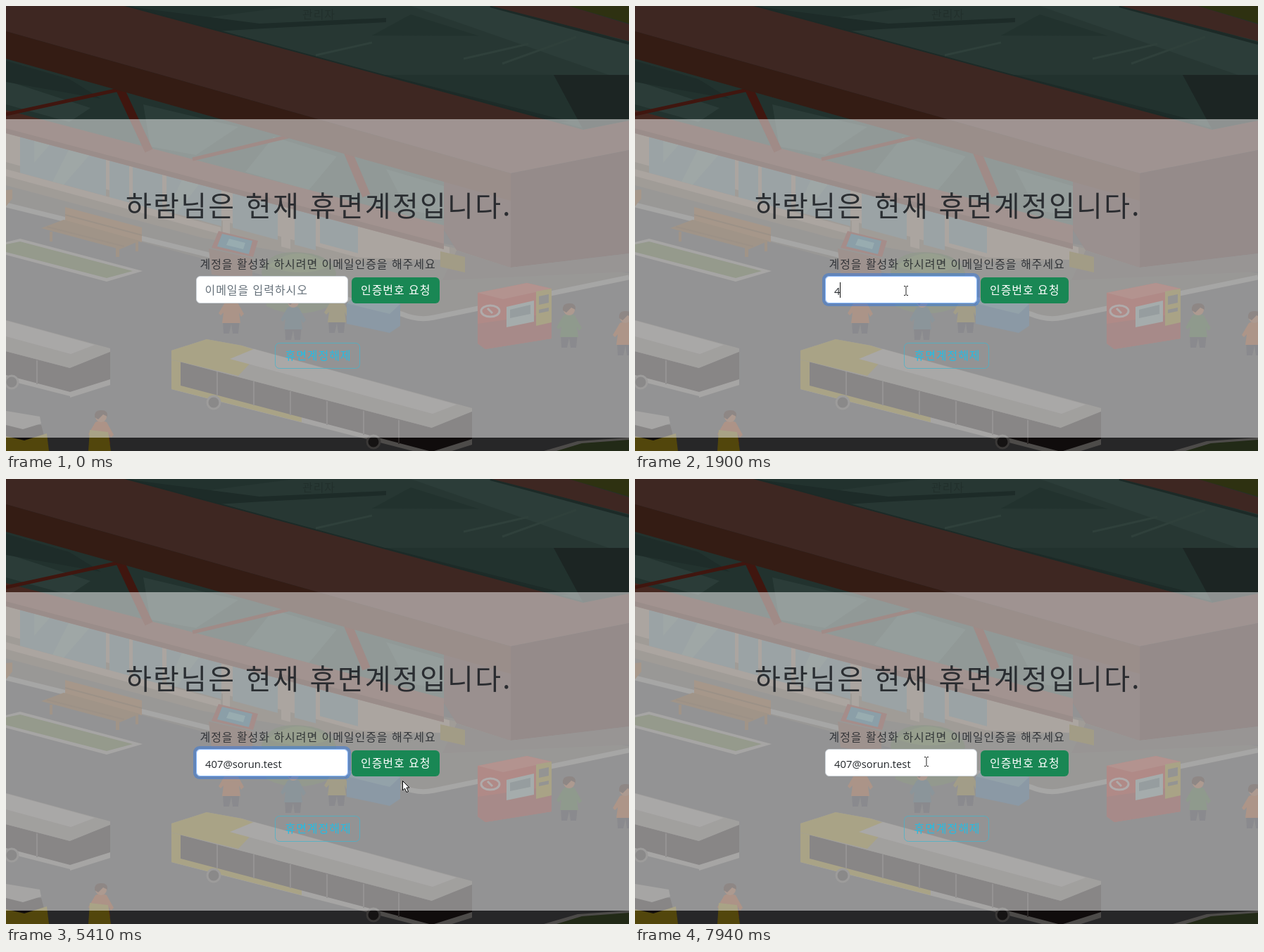
An HTML page that plays this animation: 885x633 px, repeating every 8 s.

```html
<!DOCTYPE html>
<html lang="ko">
<head>
<meta charset="utf-8">
<title>휴면계정</title>
<style>
html, body { margin: 0; width: 100%; height: 100%; overflow: hidden; background: #272728; }
svg { display: block; }
#stage { width: 100vw; height: 100vh; }
text { white-space: pre; }
.ko { font-family: "Noto Sans CJK KR", "Noto Sans CJK", sans-serif; font-size: 16px; letter-spacing: .95px; }
.en { font-family: "Open Sans", "Noto Sans CJK KR", sans-serif; }
.thin { font-weight: 350; }

.beam { fill: #3e2722; }
.under { fill: #341c14; }
.glass { fill: #22322e; }
.pane { fill: #37464a; }
.cream { fill: #564a40; }
.white { fill: #4d4b49; }
.yellow { fill: #52460c; }
.dark { fill: #100c0c; }
.wood { fill: #4c2f14; }
.red { fill: #60150f; }
.skin { fill: #5a3520; }

.anim { animation: 8s linear infinite both; }
#move { animation-name: move; }
#arrow { animation-name: arrow; }
#beamCursor { animation-name: ibeam; }
#hand { animation-name: hand; }
#list { animation-name: list; }
#ring { animation-name: ring; }
#edge { animation-name: edge; }
#hover { animation-name: hover; }
#dialog { animation-name: dialog; }

@keyframes move {
  0%, 2.3% { transform: translate(763px, 611px); }
  5% { transform: translate(610px, 525px); }
  8% { transform: translate(440px, 433px); }
  10.3%, 63.2% { transform: translate(385px, 405px); }
  67.6%, 69.4% { transform: translate(563px, 429px); }
  71%, 81.5% { transform: translate(554px, 407px); }
  83.5% { transform: translate(574px, 300px); }
  86.5%, 92.3% { transform: translate(611px, 104px); }
  94% { transform: translate(515px, 222px); }
  97.5%, 100% { transform: translate(414px, 402px); }
}
@keyframes arrow {
  0%, 2.36% { opacity: 0; }
  2.37%, 8.9% { opacity: 1; }
  8.91%, 65.7% { opacity: 0; }
  65.71%, 70.1% { opacity: 1; }
  70.11%, 81.9% { opacity: 0; }
  81.91%, 97.2% { opacity: 1; }
  97.21%, 100% { opacity: 0; }
}
@keyframes ibeam {
  0%, 8.9% { opacity: 0; }
  8.91%, 65.7% { opacity: 1; }
  65.71%, 97.2% { opacity: 0; }
  97.21%, 100% { opacity: 1; }
}
@keyframes hand {
  0%, 70.1% { opacity: 0; }
  70.11%, 81.9% { opacity: 1; }
  81.91%, 100% { opacity: 0; }
}
@keyframes list {
  0%, 11.8% { opacity: 0; }
  11.81%, 21.1% { opacity: 1; }
  23.5%, 100% { opacity: 0; }
}
@keyframes ring {
  0%, 12.1% { opacity: 0; }
  13.6%, 75.1% { opacity: 1; }
  76.8%, 100% { opacity: 0; }
}
@keyframes edge {
  0%, 12.1% { opacity: 0; }
  13.6%, 92.4% { opacity: 1; }
  94%, 100% { opacity: 0; }
}
@keyframes hover {
  0%, 65.8% { opacity: 0; }
  66.2%, 66.6% { opacity: 1; }
  67.1%, 70.1% { opacity: 0; }
  71%, 92.5% { opacity: 1; }
  94%, 100% { opacity: 0; }
}
@keyframes dialog {
  0%, 75.1% { opacity: 0; }
  76.5%, 92.3% { opacity: 1; }
  93.6%, 100% { opacity: 0; }
}
</style>
</head>
<body>
<svg id="stage" viewBox="0 0 885 633">
  <defs>
    <filter id="shadow" x="-10%" y="-10%" width="120%" height="130%">
      <feDropShadow dx="0" dy="2" stdDeviation="3" flood-opacity=".5"/>
    </filter>
    <g id="bus">
      <path class="white" d="M235 503L605 600V640L235 545z"/>
      <path class="yellow" d="M235 503L248 506V536L420 582V592L235 545z"/>
      <path class="dark" d="M248 506L605 600V634L248 540z"/>
      <path stroke="#2b2726" stroke-width="2" fill="none" d="M300 520v34M352 534v34M404 548v34M456 562v34M508 576v34M558 589v34"/>
      <path fill="#43403d" d="M235 490L285 474L335 483L662 572V577L605 600L235 503z"/>
      <path class="yellow" d="M235 490L285 474L335 483L362 492L330 526L235 503z"/>
      <path fill="#53504f" d="M318 502L352 488L640 567L606 580z"/>
      <path class="dark" d="M605 600L662 577V622L605 640z"/>
      <path class="white" d="M605 634L662 616V624L605 642z"/>
      <g fill="#151313" stroke="#3a3837" stroke-width="3"><ellipse cx="295" cy="564" rx="9" ry="9"/><ellipse cx="522" cy="620" rx="9" ry="9"/></g>
    </g>
    <g id="person">
      <path fill="#14151c" d="M-12 34H12L10 54H2L0 40L-3 54H-11z"/>
      <path fill="currentColor" d="M-8 8Q0 4 8 8L18 26L14 30L11 24L13 39H-13L-11 24L-15 28L-18 25z"/>
      <circle class="skin" r="8"/>
      <path fill="#1d0e0b" d="M-9 1Q-10-10 1-9Q10-9 9 0L3-3L-4 4z"/>
    </g>
  </defs>

  <!-- Station scene -->
  <path fill="#272728" d="M0 0H885V633H0z"/>
  <path fill="#33302d" d="M0 240L885 380V385L606 441Q580 446 560 436L0 283z"/>
  <path fill="none" stroke="#4d4c4a" stroke-width="7" d="M0 283L300 357M480 416L562 438Q585 448 608 443L885 386"/>
  <path fill="#41382f" d="M0 255L280 330L480 365L640 360V345L0 210z"/>

  <g transform="skewY(15.2)">
    <path class="cream" d="M0 172H630V190L500 222H0z"/>
    <g class="pane">
      <path d="M20 178H142V232H20zM147 178H175V234H147zM180 178H222V234H180zM228 178H306V230H228zM322 178H386V228H322zM410 178H440V228H410zM446 178H500V216H446z"/>
    </g>
    <path fill="#3e4e4c" d="M40 178H64L40 212zM90 178H120L82 232H66zM250 178H275L242 230H230z"/>
    <path class="cream" d="M0 232H305V242H0zM308 178H318V246H308zM391 176H404V236H391z"/>
  </g>

  <path class="glass" d="M0 70L622 245V322L0 152z"/>
  <g fill="#2b3c38">
    <path d="M0 106L120 145L90 165L0 140zM195 140L330 172L270 212L205 200zM380 186L470 214L430 262L340 236zM540 232L622 256V300L570 290z"/>
  </g>
  <path fill="#1e2c29" d="M0 78L90 104L135 132L0 108z"/>
  <path fill="#452720" d="M0 148L622 312V346L0 181z"/>
  <path fill="#351b15" d="M0 174L622 338V346L0 181z"/>
  <g fill="none" stroke="#40160f" stroke-width="5">
    <path d="M0 154L165 118M265 218L425 180"/>
    <path stroke-width="12" d="M160 114L203 206M485 206L512 270"/>
  </g>

  <path class="glass" d="M160 0H885V190L820 176z"/>
  <path fill="#273733" d="M410 0H690L885 52V110L575 12L520 42L885 43V98H530L390 58L250 21z"/>
  <path fill="#2c3d39" d="M575 0H690L885 52V108z"/>
  <path fill="#1d2b28" d="M168 0L360 25L540 17V23L365 32L300 36zM470 98L540 98L800 164L780 166z"/>
  <path fill="#1c2523" d="M778 98H885V163L820 176z"/>
  <path fill="none" stroke="#1c2a27" stroke-width="4" d="M688 0L885 53M168 0L820 176"/>
  <path fill="none" stroke="#2f403b" stroke-width="3" d="M650 75L742 54M705 82L810 44M440 70L520 52"/>
  <path class="beam" d="M690 0H800L885 26V50z"/>
  <path fill="#2e3111" d="M800 0H885V25z"/>

  <path class="beam" d="M0 0H168L820 176L885 163V205L717 238L0 36z"/>
  <path class="under" d="M0 36L717 238V372L640 347L622 318V250L0 75z"/>
  <path fill="#2a1614" d="M717 238L885 205V352L717 372z"/>
  <path fill="#35211e" d="M622 250L717 277V372L640 347L622 318z"/>
  <path fill="#312b29" d="M640 348L717 372L885 352V378L620 390z"/>
  <path fill="#45390c" d="M617 349L652 357V379L617 371z"/>

  <path class="white" d="M0 336L20 331L194 377L143 392L0 354z"/>
  <path fill="#2a3419" d="M0 339L20 335L180 377L143 387L0 350z"/>
  <g class="wood">
    <path d="M84 286L193 315V336L84 307z"/>
    <path fill="#402910" d="M50 316L82 304L190 334L162 346zM62 321h4v14h-4zM156 343h5v14h-5zM184 335h4v14h-4z"/>
    <path d="M0 262L9 261V274L0 285z"/>
  </g>
  <path fill="none" stroke="#38230e" stroke-width="2" d="M84 297L193 326M58 314L168 342"/>

  <path fill="#4a1a15" d="M302 320L358 334L351 357L292 344z"/>
  <path fill="#163e50" d="M307 324L350 334L345 353L300 342z"/>
  <path fill="#315860" d="M317 331L340 337L337 346L313 340z"/>
  <path fill="#3d241d" d="M288 345L350 359V390L292 382z"/>
  <path fill="#26331c" d="M363 378Q370 350 410 350Q462 351 469 380L460 427Q414 448 370 427z"/>
  <path fill="#2f3e1d" d="M372 370Q415 334 461 370Q420 388 372 370z"/>
  <use href="#person" x="320" y="412" color="#562910"/>
  <use href="#person" x="408" y="421" color="#172a35"/>
  <use href="#person" x="470" y="411" color="#453b10"/>
  <path fill="#16324a" d="M484 423L500 410L560 424V455L545 465L484 452z"/>
  <path fill="#274453" d="M484 423L500 410L560 424L545 438z"/>

  <path class="red" d="M670 408L740 394L775 402V473L681 488L670 480z"/>
  <path fill="#66261f" d="M670 408L740 394L775 402L706 417z"/>
  <path fill="#4f1512" d="M670 452L775 437V473L681 488L670 480z"/>
  <ellipse cx="688" cy="434" rx="13" ry="8" fill="none" stroke="#605756" stroke-width="3"/>
  <path stroke="#605756" stroke-width="3" d="M684 430L691 437"/>
  <path fill="#4b5958" d="M711 428L750 419V449L711 457z"/>
  <path fill="#2c3a3e" d="M716 432L745 425V438L716 444z"/>
  <path class="yellow" d="M753 406L775 402V450L753 455z"/>
  <path fill="#282827" d="M757 413L771 410V422L757 425zM757 432L771 429V434L757 437z"/>
  <use href="#person" x="800" y="432" color="#1f341b"/>
  <use href="#person" x="880" y="443" color="#5a2a10"/>

  <use href="#bus" x="-514" y="-85"/>
  <use href="#bus"/>
  <path class="dark" d="M0 590L50 596L60 633H0z"/>
  <path class="white" d="M0 576L48 584L50 594L24 602L0 596z"/>
  <path class="yellow" d="M0 612L26 618L58 608L61 633H0z"/>
  <use href="#person" x="135" y="584" color="#5a260f"/>
  <path class="yellow" d="M119 603L145 606L149 633H117z"/>
  <path class="white" d="M764 633L812 619L885 614V633z"/>
  <path fill="#222a17" d="M782 633L818 622L885 617V633z"/>

  <path fill="#fff" opacity=".5" d="M0 161H885V614H0z"/>

  <!-- Page -->
  <text class="ko thin" x="421" y="18" fill="#000" opacity=".14">관리자</text>
  <text class="ko thin" x="170" y="299" fill="#212529" fill-opacity=".93" style="font-size:40px;letter-spacing:2.3px">하람님은 현재 휴면계정입니다.</text>
  <text class="ko thin" x="275.5" y="372.5" fill="#212529" fill-opacity=".85">계정을 활성화 하시려면 이메일인증을 해주세요</text>

  <rect id="ring" class="anim" x="266" y="380" width="224" height="47" rx="9" fill="#0d6efd" fill-opacity=".36"/>
  <rect x="270.5" y="384.5" width="215" height="38" rx="5.5" fill="#fff" stroke="#ced4da"/>
  <rect id="edge" class="anim" x="270.5" y="384.5" width="215" height="38" rx="5.5" fill="none" stroke="#86b7fe"/>
  <text id="hint" class="ko thin" x="282.5" y="410" fill="#66717a">이메일을 입력하시오</text>
  <text id="typed" class="en" x="283" y="411" font-size="14.8" fill="#212529"></text>
  <path id="caret" stroke="#111" d="M.5 393V415"/>

  <rect x="491" y="386" width="125" height="37" rx="6" fill="#198754"/>
  <rect id="hover" class="anim" x="491" y="386" width="125" height="37" rx="6" fill="#157347"/>
  <text class="ko" x="504" y="410" fill="#fff">인증번호 요청</text>

  <rect x="382.5" y="479.5" width="120" height="36" rx="6" fill="none" stroke="#45b4cd" stroke-opacity=".75"/>
  <text class="ko" x="396.5" y="503" fill="#25bce3">휴면계정해제</text>

  <g id="list" class="anim" filter="url(#shadow)">
    <path fill="#292a2d" d="M362 433H370L378.500 425L387 433H555Q559 433 559 437V578Q559 582 555 582H362Q358 582 358 578V437Q358 433 362 433z"/>
    <g class="en" font-size="12.6" fill="#fff">
      <text x="370" y="459">bimo41@sorun.test</text>
      <text x="370" y="494.500">hhana3mul@sorun.test</text>
      <text x="370" y="530">tel22oka@sorun.test</text>
      <text x="370" y="565.500">marisnow3051@pomel.test</text>
    </g>
  </g>

  <g id="dialog" class="anim">
    <rect x="231" y="-10" width="439" height="134" rx="4" fill="#292a2d" filter="url(#shadow)"/>
    <text class="en" x="247" y="28.500" font-size="14.6" fill="#e8eaed">localhost:8080 내용:</text>
    <text class="ko" x="247" y="56.500" fill="#e8eaed" style="font-size:14px;letter-spacing:0">이메일이 일치하지 않습니다.</text>
    <rect x="592" y="77" width="63" height="31" rx="5" fill="#292a2d" stroke="#4688f1" stroke-width="2"/>
    <rect x="594" y="79" width="59" height="27" rx="3" fill="#8ab4f8"/>
    <text class="ko" x="611.500" y="97" fill="#202124" style="font-size:13px;letter-spacing:0">확인</text>
  </g>

  <g id="move" class="anim">
    <path id="arrow" class="anim" fill="#fff" stroke="#000" d="M.5.5V14L3.500 11L6 16.500L8.500 15.500L6 10H10z"/>
    <path id="beamCursor" class="anim" fill="none" stroke="#222" d="M-3-6.500H-1L0-5.500L1-6.500H3M0-5.500V5.500M-3 6.500H-1L0 5.500L1 6.500H3"/>
    <path id="hand" class="anim" fill="#fff" stroke="#000" stroke-linejoin="round" d="M-1.500 11V1.500Q0-1.500 1.500 1.500V7L4 7.500L9 9Q11 10 10.500 12L9 18H1L-4.500 11.500Q-4.500 9-1.500 11z"/>
  </g>
</svg>
<script>
const LOOP = 8000;
const CARET_ON = 530;
const FOCUS = 940;
const BLUR = 6010;
const address = '407@sorun.test';
const keyTimes = [1690, 2030, 2100, 2650, 3200, 3310, 3430, 3540, 3660, 4190, 4390, 4590, 4660, 4660];

const [hint, typed, caret] = ['hint', 'typed', 'caret'].map(id => document.getElementById(id));
let start;

function draw(now) {
  start ??= now;
  const t = (now - start) % LOOP;
  const count = keyTimes.filter(k => k <= t).length;
  const lastKey = count ? keyTimes[count - 1] : FOCUS;
  const caretOn = t >= FOCUS && t < BLUR && t - lastKey < CARET_ON;

  typed.textContent = address.slice(0, count);
  hint.style.opacity = count ? 0 : 1;
  const x = count ? 283 + Math.round(typed.getComputedTextLength()) : 282;
  caret.setAttribute('transform', `translate(${x})`);
  caret.style.opacity = caretOn ? 1 : 0;
  requestAnimationFrame(draw);
}
requestAnimationFrame(draw);
</script>
</body>
</html>
```
